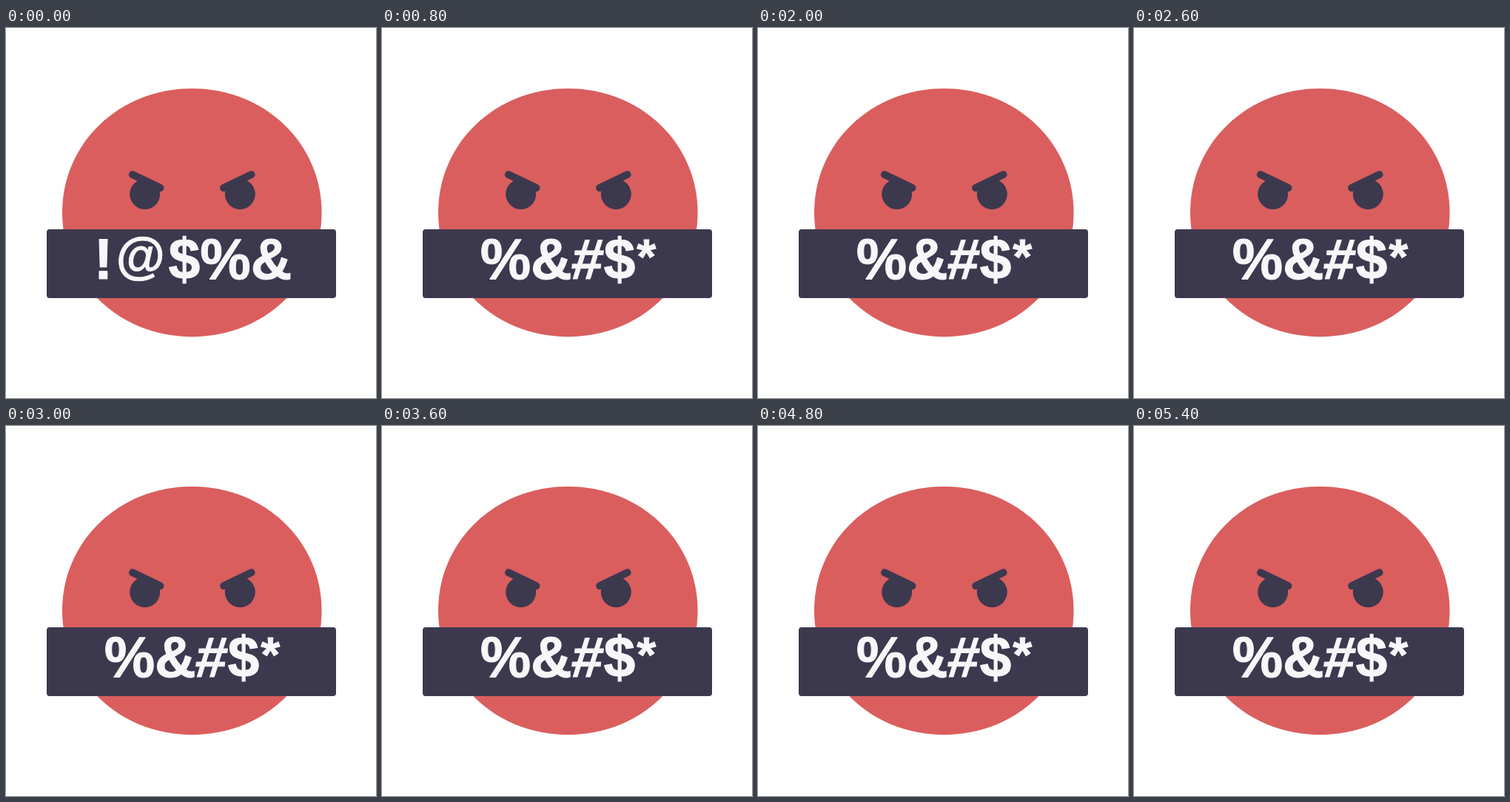
Write an HTML page with a canvas that moves like this. It is 500x500 px and loops after 5.61 s.

```html
<!DOCTYPE html>
<html lang="en">
<head>
<meta charset="utf-8">
<title>Censored</title>
<style>
html, body { margin: 0; width: 100%; height: 100%; overflow: hidden; background: #fff; }
canvas { display: block; width: 500px; height: 500px; }
</style>
</head>
<body>
<canvas id="stage" width="500" height="500"></canvas>
<script>
const ctx = document.getElementById('stage').getContext('2d');
const RED = '#da5e5e', DARK = '#3c384e', LIGHT = '#f7f7f9';
const LOOP = 5610, STEP = 200, STEPS = 28, ROUND = 14;
const WORDS = ['!@$%&', '%&#$*', '$*!@#'];
const SIZE = 77, BASE = 339.4, MIDDLE = 252.5;

// Shape changes for single glyphs: scale, rise above the baseline, slant
const PLAIN = { scale: 1, rise: 0, slant: 0 };
const GLYPHS = {
  '@': { scale: 0.88, rise: 8.5, slant: 0 },
  '#': { scale: 1, rise: 0, slant: 0.1 },
  '*': { scale: 0.87, rise: 7.5, slant: 0 }
};

// A slightly full oval made of four curves
function face(x, y, rx, ry) {
  const kx = rx * 0.56, ky = ry * 0.56;
  ctx.fillStyle = RED;
  ctx.beginPath();
  ctx.moveTo(x, y - ry);
  ctx.bezierCurveTo(x + kx, y - ry, x + rx, y - ky, x + rx, y);
  ctx.bezierCurveTo(x + rx, y + ky, x + kx, y + ry, x, y + ry);
  ctx.bezierCurveTo(x - kx, y + ry, x - rx, y + ky, x - rx, y);
  ctx.bezierCurveTo(x - rx, y - ky, x - kx, y - ry, x, y - ry);
  ctx.fill();
}

// side: -1 for the left eye, 1 for the right
function eye(side) {
  const x = 252 + side * 64.3;
  ctx.fillStyle = ctx.strokeStyle = DARK;
  ctx.beginPath();
  ctx.arc(x, 224.5, 20.5, 0, Math.PI * 2);
  ctx.fill();
  ctx.lineWidth = 10;
  ctx.lineCap = 'round';
  ctx.beginPath();
  ctx.moveTo(x - 0.7 + side * 16, 198);
  ctx.lineTo(x - 0.7 - side * 21.5, 216);
  ctx.stroke();
}

function word(text) {
  ctx.font = `bold ${SIZE}px "Liberation Sans", Arial, sans-serif`;
  ctx.textAlign = 'center';
  ctx.fillStyle = ctx.strokeStyle = LIGHT;
  ctx.lineJoin = 'round';
  ctx.lineWidth = 1;
  let x = MIDDLE - ctx.measureText(text).width / 2;
  for (const ch of text) {
    const { scale, rise, slant } = GLYPHS[ch] || PLAIN;
    const w = ctx.measureText(ch).width;
    ctx.save();
    ctx.translate(x + w / 2, BASE - rise);
    // Lean around the middle of the capital height
    ctx.transform(scale, 0, -slant, scale, -slant * SIZE * 0.34, 0);
    ctx.fillText(ch, 0, 0);
    ctx.strokeText(ch, 0, 0);
    ctx.restore();
    x += w;
  }
}

function draw(t) {
  const step = Math.min(STEPS - 1, Math.floor(t / STEP));
  ctx.fillStyle = '#fff';
  ctx.fillRect(0, 0, 500, 500);
  face(251.3, 249.5, 175.3, 167.7);
  eye(-1);
  eye(1);

  ctx.fillStyle = DARK;
  ctx.beginPath();
  ctx.roundRect(55, 272, 391, 93, 4);
  ctx.fill();

  word(WORDS[step % ROUND % WORDS.length]);
}

const start = performance.now();
function tick() {
  draw((performance.now() - start) % LOOP);
  requestAnimationFrame(tick);
}
tick();
</script>
</body>
</html>
```
